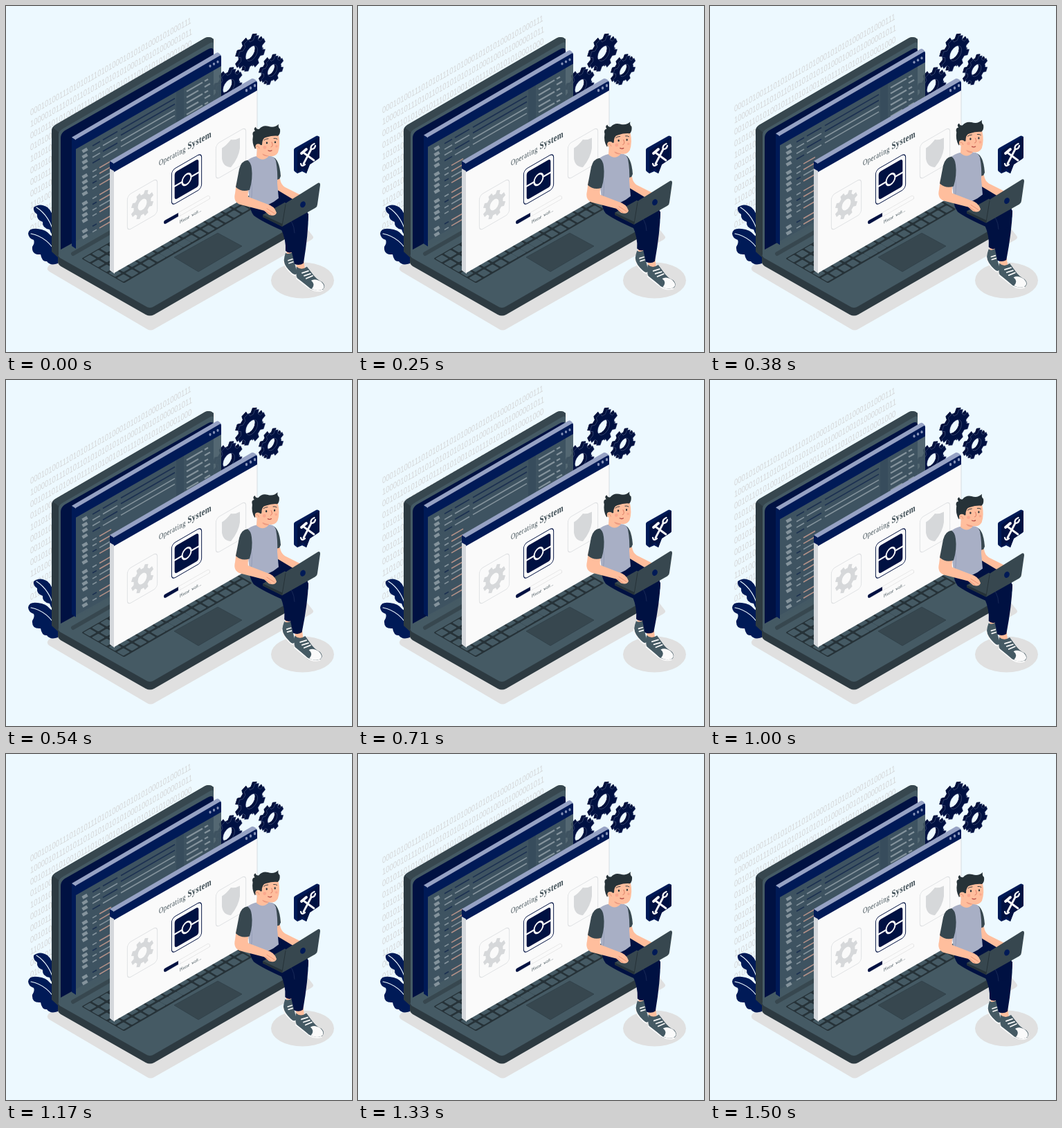
These frames come from a looping animation (500x500 px, 1.54 s). An HTML page:

```html
<!DOCTYPE html>
<html lang="en">
<head>
<meta charset="utf-8">
<title>Operating system setup</title>
<style>
html, body { margin: 0; width: 100%; height: 100%; overflow: hidden; background: #edf9ff; }
svg { display: block; width: 100vw; height: 100vh; }
.navy { fill: #001142; }
.bar { fill: #001a57; }
.edge { fill: #96a2c4; }
.grey { fill: #455a64; }
.slate { fill: #37474f; }
.side { fill: #2d3a41; }
.ink { fill: #263238; }
.skin { fill: #ffbe9d; }
.white { fill: #fafafa; }
.pale { fill: #e0e0e0; }
.line { fill: none; stroke-linecap: round; stroke-linejoin: round; }
.digits { font: 13px Arial, "Liberation Sans", sans-serif; fill: #d4d6d7; }
.serif { font-family: "Liberation Serif", "Times New Roman", serif; fill: #37474f; }
</style>
</head>
<body>
<svg viewBox="0 0 500 500">
  <rect width="500" height="500" fill="#edf9ff"/>
  <path class="pale" d="M62 375 L76 366 L208 440 L432 318 L443 332 Q446 335 441 338 L214 467 Q209 470 204 467 L63 384 Q57 380 62 375Z"/>
  <ellipse class="pale" cx="428.500" cy="396.500" rx="45.500" ry="26"/>
  <g id="digits" class="digits"></g>

  <g class="bar">
    <path d="M40 291 Q49 284 60 291 Q68 298 69 312 L74 340 Q65 330 63 323 Q52 321 53 312 Q44 309 45 301 Q39 297 40 291Z"/>
    <path d="M32 329 Q33 320 46 322 Q58 323 64 331 Q75 338 77 362 L75 372 Q64 376 59 369 Q52 370 50 359 Q37 360 38 348 Q42 342 40 338 Q33 336 32 329Z"/>
  </g>
  <path class="line" stroke="#edf9ff" stroke-width="1.100" d="M44 291 Q63 303 70 331 M36 329 Q61 334 74 360"/>
  <g id="gears"></g>

  <!-- laptop -->
  <path class="side" d="M66 180 Q66 175 71 172 L288 46 Q295 43 300 48 V240 L78 366 L66 355Z"/>
  <path class="slate" d="M68 176 L71 172 L288 46 Q295 43 300 48 L300 54 L81 180 L77 183Z"/>
  <path class="grey" d="M76 186 Q76 181 81 178 L294 54 Q300 50 300 56 V235 L76 361Z"/>
  <path class="navy" d="M79 191 Q79 184 85 180 L291 63 Q300 58 300 66 V230 L79 352Z"/>
  <path class="side" d="M75 361 V370 Q75 373 79 376 L202 446 Q208 449 214 446 L429 322 Q432 320 432 317 V306 L208 434Z"/>
  <path class="grey" d="M78 357 L300 231 L429 304 Q434 307 429 310 L214 434 Q208 438 202 434 L78 364 Q73 360 78 357Z"/>
  <path class="line" stroke="#37474f" stroke-width="6" d="M97 358 L290 247"/>
  <g id="keys"></g>
  <path class="slate" stroke="#2d3c44" stroke-width=".6" d="M243 363 L306 328 L341 347 L278 384Z"/>

  <!-- code window -->
  <g id="back">
    <path class="bar" d="M95 190 L101 194 V351 L95 347Z"/>
    <path fill="#455a64" opacity=".91" d="M101 205 L311 85 V230 L101 351Z"/>
    <path fill="#22384f" opacity=".22" d="M246 122 L257 116 V190 H246Z"/>
    <path class="edge" d="M95 190 L304 68 Q307 66 311 72 L101 194Z"/>
    <path class="bar" d="M101 193 L309 72 Q311 71 311 74 V87 L101 207Z"/>
    <g fill="#8793b8"><ellipse cx="295" cy="87" rx="1.600" ry="2.100"/><ellipse cx="300.500" cy="84" rx="1.600" ry="2.100"/><ellipse cx="306" cy="81" rx="1.600" ry="2.100"/></g>
    <g id="code" fill="none"></g>
  </g>

  <!-- setup window -->
  <path fill="#d5d8dc" d="M150 225 L157 228 V387 L150 382Z"/>
  <path class="white" d="M156 238 L363 119 V267 L156 386Z"/>
  <path class="line" stroke="#d3d9de" stroke-width=".9" d="M363 122 V266"/>
  <path class="bar" d="M150 224 L157 228 V239 L150 235Z"/>
  <path class="edge" d="M150 224 L355 105 Q358 104 363 109 L156 228Z"/>
  <path class="bar" d="M156 227.500 L360 109.500 Q363 108 363 111 V122 L156 240Z"/>
  <g fill="#8793b8"><ellipse cx="347.500" cy="122" rx="1.700" ry="2.300"/><ellipse cx="353.500" cy="118.500" rx="1.700" ry="2.300"/><ellipse cx="359.500" cy="115" rx="1.700" ry="2.300"/></g>
  <g class="serif">
    <text transform="matrix(.74 -.4 0 1 221 231)" font-size="11.800" letter-spacing=".6">Operating</text>
    <text transform="matrix(.74 -.4 0 1 262.500 207.500)" font-size="14.300" font-weight="bold" letter-spacing=".5">System</text>
    <text transform="matrix(.74 -.43 0 1 251 314.500)" font-size="7" letter-spacing=".25" word-spacing="2">Please wait...</text>
  </g>
  <g id="tiles"></g>
  <path class="line" stroke="#e0e0e0" stroke-width="6" d="M231 312 L292 277"/>
  <path class="line" stroke="#fafafa" stroke-width="4.600" d="M231 312 L292 277"/>
  <path class="navy" d="M249 299 V304 L231 314.500 Q228 316 228 312.500 Q228 310.500 230 309.500Z"/>

  <!-- tool bubble -->
  <path class="bar" d="M416 208 Q416 206 418 205 L448 188 Q450 186.500 453 189 V218 Q453 220 451 221 L439 229 L434 242 L428 239 L421 242 L417 239 Q416 238 416 237Z"/>
  <path class="navy" d="M421 211 Q421 209 423 208 L451 190 Q453 189 453 191 V218 Q453 220 451 221 L439 229 L434 242 L430 235 L421 241Z"/>
  <g class="line" stroke="#fafafa">
    <path stroke-width="2.800" d="M430 228 L441 207 M430 212 L445 223"/>
    <path stroke-width="3.800" d="M427 213 L434 207"/>
    <path stroke-width="2.300" d="M445.500 199 Q439 202 441 207 Q446 207 447 202 M426 228 Q427 233 432 229"/>
  </g>

  <!-- seated person -->
  <g id="person">
    <path class="slate" d="M384 218 Q395 220 397 246 L392 258 L386 250Z"/>
    <path class="skin" d="M389 252 L396 250 Q397 258 403 262 L425 273 L421 281 L399 277 L386 270Z"/>
    <g id="shins">
      <path class="skin" d="M405 348 L415 348 L415 362 L406 361Z"/>
      <path class="grey" d="M404 357 Q408 360 414 356 L416 368 L421 386 Q420 391 414 388 L403 376 Q400 369 404 357Z"/>
      <path class="line" stroke="#fafafa" stroke-width="1.700" d="M401 369 Q402 377 412 386 Q417 391 420 388 M408 368 L414 366 M409 372 L415 370"/>
      <path class="skin" d="M418 366 H430 L432 380 Q427 385 421 380Z"/>
      <path class="navy" d="M397 308 L437 300 Q437 330 430 372 Q424 376 417 373 L413 356 Q408 358 404 354 Q405 338 397 321Z"/>
      <path class="grey" d="M420 377 Q427 383 435 377 L442 386 Q449 396 457 399 Q463 405 458 410 Q449 414 439 410 L421 394 Q418 386 420 377Z"/>
      <path class="white" d="M441 397 Q447 393 456 399 Q463 406 457 410 Q449 413 442 409 Q448 402 441 397Z"/>
      <path class="line" stroke="#fafafa" stroke-width="1.800" d="M420 394 Q432 403 439 409 Q449 414 457 411 M428 386 L437 383 M431 390 L440 387 M434 394 L443 390"/>
    </g>
    <path class="navy" d="M352 284 L392 266 L422 284 Q435 291 437 303 Q437 318 427 328 L402 326 Q370 312 358 303 Q352 295 352 284Z"/>
    <path class="line" stroke="#20305e" stroke-width=".8" d="M405 306 Q416 310 417 328"/>
    <path fill="#a8afc5" d="M347 225 Q353 219 363 217 Q370 223 379 217 Q387 216 390 224 Q393 240 392 256 L394 278 Q374 295 352 288 Q352 272 347 251Z"/>
    <path class="line" stroke="#949db7" stroke-width="1" d="M354 250 Q357 267 354 282"/>
    <path class="skin" d="M363 205 L380 208 L379 218 Q371 226 362 218Z"/>
    <path fill="#ed9b80" d="M370 214 Q374 219 380 217 V213Z"/>
    <g id="head">
      <path class="skin" d="M363 190 Q366 183 380 185 L394 187 Q397 201 393 212 Q389 219 380 217 Q368 214 364 207Z"/>
      <path class="ink" d="M360 207 Q355 198 357 188 Q355 182 360 181 Q357 177 361 175 Q362 179 366 178 Q371 172 379 174 Q388 177 394 171 Q393 176 396 178 Q397 185 393 188 Q386 187 376 190 Q370 191 370 201 L364 202Z"/>
      <circle class="skin" cx="364.500" cy="203.500" r="4"/>
      <path class="line" stroke="#e58b70" stroke-width=".8" d="M362 203 Q365 201 366 206"/>
      <g class="ink"><ellipse cx="377" cy="198" rx="1.200" ry="1.600"/><ellipse cx="389" cy="197" rx="1.100" ry="1.600"/></g>
      <path class="line" stroke="#263238" stroke-width=".9" d="M373 194 Q375 192 379 192 M387 191.500 Q390 191 392 192.500"/>
      <path class="line" stroke="#db765f" stroke-width=".9" d="M384 197 Q387 203 383 204"/>
      <path class="line" stroke="#b64c45" stroke-width="1.300" d="M379 209 Q381.500 210.500 384 209"/>
      <circle cx="374" cy="204.500" r="2.400" fill="#f69a83" opacity=".6"/>
      <circle cx="391" cy="203" r="1.800" fill="#f69a83" opacity=".6"/>
    </g>
    <path class="slate" d="M371 302 L403 284 L420 297 L399 319 L371 305Z"/>
    <path class="ink" d="M371 302 L399 315 V319 L371 305Z"/>
    <path class="slate" d="M404 287 Q404 285 406 284 L451 256 Q454 255 454 259 L450 287 Q450 290 447 292 L399 319Z"/>
    <path class="line" stroke="#263238" stroke-width="1" d="M404 287 L399 318"/>
    <ellipse class="bar" cx="429" cy="287" rx="3.700" ry="4.700" transform="rotate(25 429 287)"/>
    <path class="skin" d="M333 256 L351 263 Q349 272 350 276 L376 286 Q388 289 391 299 Q389 305 380 302 L373 296 L338 287 Q328 283 331 271Z"/>
    <path class="line" stroke="#e58b70" stroke-width=".8" d="M377 293 L388 300 M375 296 L383 302"/>
    <path class="slate" d="M349 223 Q340 224 337 236 L332 262 Q341 270 352 266 Q357 250 355 235 Q354 226 349 223Z"/>
  </g>
</svg>
<script>
const $ = id => document.getElementById(id);
const LOOP = 1540, STEPS = 37, SLOPE = 0.577;
const iso = (x, y, body) => `<g transform="matrix(.866 -.5 0 1 ${x} ${y})">${body}</g>`;
const repeat = (n, f) => Array.from({ length: n }, (_, i) => f(i)).join("");

let seed = 7;
const rand = () => (seed = seed * 16807 % 2147483647) / 2147483647;

// Binary backdrop: readable starts, then random bits
const starts = [
  "000101001110101011101010001010101000101000111",
  "100001011101011010101010101000100101000001011",
  "001011010100101110101001010111010101010001000",
  "010100", "101010", "001010", "001011", "001010", "110100", "000101", "010011"
];
$("digits").innerHTML = starts.map((s, i) => {
  const bits = s + repeat(45 - s.length, () => rand() < 0.5 ? 0 : 1);
  return `<text transform="matrix(.728 -.42 0 1 35 ${159 + i * 16.8})">${bits}</text>`;
}).join("");

// Teeth sit half a pitch off the axes
function gearPath(r, root, hole, teeth) {
  const pts = [];
  for (let i = 0; i < teeth; i++) {
    [[-0.31, root], [-0.2, r], [0.2, r], [0.31, root]].forEach(([d, q]) => {
      const a = (i + 0.5 + d) * 2 * Math.PI / teeth;
      pts.push((q * Math.cos(a)).toFixed(1) + " " + (q * Math.sin(a)).toFixed(1));
    });
  }
  return `M${pts.join("L")}Z M${hole} 0A${hole} ${hole} 0 1 0 ${-hole} 0A${hole} ${hole} 0 1 0 ${hole} 0Z`;
}
function gear(x, y, r) {
  const d = gearPath(r, r * 0.76, r * 0.42, 8);
  const face = attrs => `<path d="${d}" fill-rule="evenodd" stroke-linejoin="round" ${attrs}/>`;
  return iso(x - 2.5, y - 1.5, face('fill="#000f3b" stroke="#000f3b"')) +
    iso(x + 1, y + 0.5, face('fill="#001142" stroke="#7e8caf" stroke-width=".35"'));
}
$("gears").innerHTML = gear(321, 116, 23) + gear(354, 68, 23.5) + gear(384, 92.5, 19);

// Keyboard, in floor coordinates
const keys = repeat(5, r => repeat(15, c => {
  const wide = r === 4 && c > 3 && c < 8;
  return `<rect x="${c * 14.2 + 1.5}" y="${r * 14 + 1.5}" width="${wide ? 14.2 : 11.2}" height="11" rx="1.500" fill="#455a64"/>`;
}));
$("keys").innerHTML = `<g transform="matrix(.866 -.5 .866 .5 109 365)">
  <rect width="214" height="71" rx="2" fill="#263238"/>${keys}</g>`;

// Code listing
const seg = (x, y, len, color, w = 1.6) =>
  `<path stroke="${color}" stroke-width="${w}" d="M${x} ${y - (x - 110) * SLOPE}l${len} ${-len * SLOPE}"/>`;
const GREY = "#84939c", DARK = "#1c3050", WARM = "#b39188";
let code = "";
[0, 1, 2, 3, 4.5, 5.5, 6.5, 7.5, 9.2, 10.2, 11.2, 12.2, 14, 15].forEach((row, i) => {
  const y = 211 + row * 8.3;
  code += seg(110.500, y, 7, GREY, 4.6);
  code += seg(125, y, i < 4 ? 11 : 6, i % 3 ? GREY : DARK);
  if (i < 4) {
    code += seg(140, y, 21, i % 2 ? GREY : DARK);
    code += seg(166, y, 78, i > 1 ? GREY : DARK);
  } else code += seg(135, y, 17, i % 4 === 2 ? GREY : WARM);
});
for (let i = 0; i < 6; i++) {
  code += seg(261, 211 + i * 8.3, i % 2 ? 17 : 23, GREY, 2.2);
  code += seg(287, 211 + i * 8.3, i % 2 ? 8 : 5, GREY, 2.2);
}
$("code").innerHTML = code;

// Tiles are centred squares
const tile = (x, y, color, icon) => iso(x, y,
  `<rect x="-25" y="-25.500" width="50" height="51" rx="6" fill="#fafafa" stroke="${color}" stroke-width="1.100"/>${icon}`);
const shield = '<path fill="#d6d8da" d="M0 -20 Q8 -15 15 -15 V0 Q13 13 0 20 Q-13 13 -15 0 V-15 Q-8 -15 0 -20Z"/>';
const disk = `<rect x="-20" y="-20" width="40" height="40" rx="4" class="navy"/>
  <path class="line" stroke="#fafafa" stroke-width="2.600" d="M-20 0H-8M20 0H8"/>
  <circle r="7.500" class="navy" stroke="#fafafa" stroke-width="2.600"/>`;
$("tiles").innerHTML =
  tile(197, 287, "#dfe1e3", `<path fill="#d6d8da" fill-rule="evenodd" d="${gearPath(19, 14.5, 7.5, 8)}"/>`) +
  tile(261, 250.5, "#001142", disk) +
  tile(325, 213, "#dfe1e3", shield);

function draw(t) {
  const step = Math.floor(t / LOOP * STEPS + 0.1);
  const lift = (1 - Math.cos(2 * Math.PI * (step / STEPS + 0.052))) / 2;
  const move = (id, dx, dy, extra = "") =>
    $(id).setAttribute("transform", `translate(${dx * lift} ${dy * lift})${extra}`);
  move("digits", 0, -9);
  move("back", 0, -9);
  move("person", 0, -8.6);
  move("head", -0.5, -0.4, ` rotate(${-1.5 * lift} 371 214)`);
  move("shins", 0, 0.6, ` rotate(${2.2 * lift} 425 302)`);
}
function tick(now) {
  draw(now % LOOP);
  requestAnimationFrame(tick);
}
draw(0);
requestAnimationFrame(tick);
</script>
</body>
</html>
```
